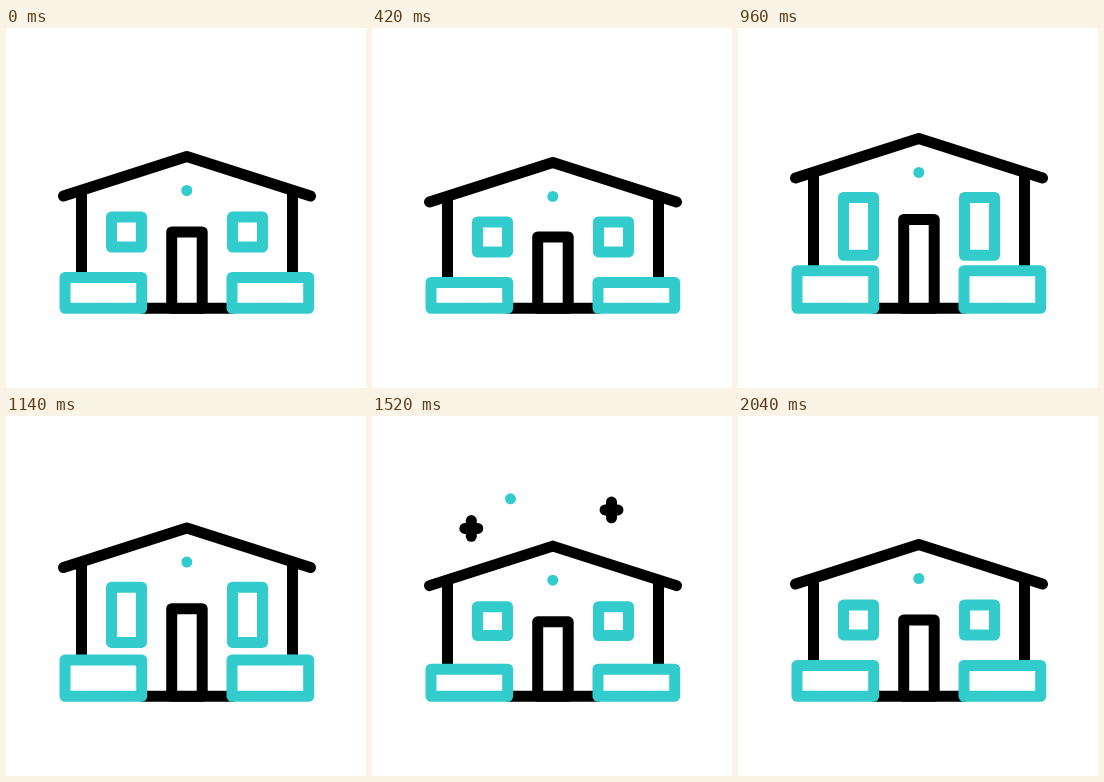
An HTML page with a canvas for the animation above (2.42 s loop, 360 by 360 pixels).

```html
<!DOCTYPE html>
<html lang="en">
<head>
<meta charset="utf-8">
<title>House</title>
<style>
html, body { margin: 0; height: 100%; overflow: hidden; background: #fff; }
canvas { display: block; width: 360px; height: 360px; }
</style>
</head>
<body>
<canvas id="stage" width="360" height="360"></canvas>
<script>
const ctx = document.getElementById("stage").getContext("2d");
const LOOP = 2420, BLACK = "#000", TEAL = "#33cccc";

// Vertical offsets at each pose: rest, squash, stretch, squash, rest
const TIMES = [0, 500, 1060, 1380, 1660];
const POSES = {
  roof: [0, 6.3, -20, 3.3, 0],
  door: [0, 5.3, -14, 3.6, 0],
  box: [0, 5.3, -7.8, 7.5, 0],
  winTop: [0, 5.3, -21.5, 3.4, 0],
  winBottom: [0, 5.3, 8.5, 1.2, 0]
};

const clamp = x => Math.max(0, Math.min(1, x));
const ramp = (t, a, b) => clamp((t - a) / (b - a));
const ease = x => (1 - Math.cos(Math.PI * x)) / 2;

function offset(part, t) {
  const v = POSES[part];
  let i = 0;
  while (i < 3 && t >= TIMES[i + 1]) i++;
  return v[i] + (v[i + 1] - v[i]) * ease(ramp(t, TIMES[i], TIMES[i + 1]));
}

function line(color, ...pts) {
  ctx.strokeStyle = color;
  ctx.beginPath();
  for (let i = 0; i < pts.length; i += 2) ctx.lineTo(pts[i], pts[i + 1]);
  ctx.stroke();
}

function box(color, left, top, right, bottom) {
  ctx.fillStyle = "#fff";
  ctx.strokeStyle = color;
  ctx.beginPath();
  ctx.rect(left, top, right - left, bottom - top);
  ctx.fill();
  ctx.stroke();
}

function dot(color, x, y, alpha = 1) {
  ctx.globalAlpha = alpha;
  ctx.fillStyle = color;
  ctx.beginPath();
  ctx.arc(x, y, 5.5, 0, 2 * Math.PI);
  ctx.fill();
  ctx.globalAlpha = 1;
}

function plus(x, y, t) {
  if (t <= 1280 || t >= 2030) return;
  const out = 1 - ease(ramp(t, 1750, 2030));
  const grow = ramp(t, 1280, 1710);
  const h = 11.5 * grow * out;
  const v = 16 * ramp(t, 1340, 1710) * out;
  const cy = y + 13.5 * (1 - grow);
  line(BLACK, x - h, cy, x + h, cy);
  line(BLACK, x, cy - v, x, cy + v);
}

function draw(t) {
  ctx.fillStyle = "#fff";
  ctx.fillRect(0, 0, 360, 360);
  ctx.lineWidth = 11;
  ctx.lineCap = ctx.lineJoin = "round";

  const roof = offset("roof", t);
  for (const x of [75.5, 286.5]) line(BLACK, x, 165 + roof, x, 262);
  line(BLACK, 57.5, 168 + roof, 180.8, 128.5 + roof, 304.5, 168 + roof);
  dot(TEAL, 180.8, 162.5 + roof);

  line(BLACK, 136, 280.3, 226, 280.3);
  box(BLACK, 165.7, 204 + offset("door", t), 196.2, 280.3);

  const top = 189 + offset("winTop", t), bottom = 219 + offset("winBottom", t);
  for (const x of [105.5, 226.5]) box(TEAL, x, top, x + 30, bottom);
  for (const x of [59, 226]) box(TEAL, x, 249.5 + offset("box", t), x + 76.7, 280.3);

  plus(99.3, 106.5, t);
  plus(239.5, 88, t);
  dot(TEAL, 138.5, 82.8, ramp(t, 1300, 1400) * (1 - ramp(t, 1540, 1660)));
  dot(BLACK, 279.3, 108.5, ramp(t, 1560, 1660) * (1 - ramp(t, 1820, 1940)));
}

const start = performance.now();
function tick() {
  draw((performance.now() - start) % LOOP);
  requestAnimationFrame(tick);
}
tick();
</script>
</body>
</html>
```
